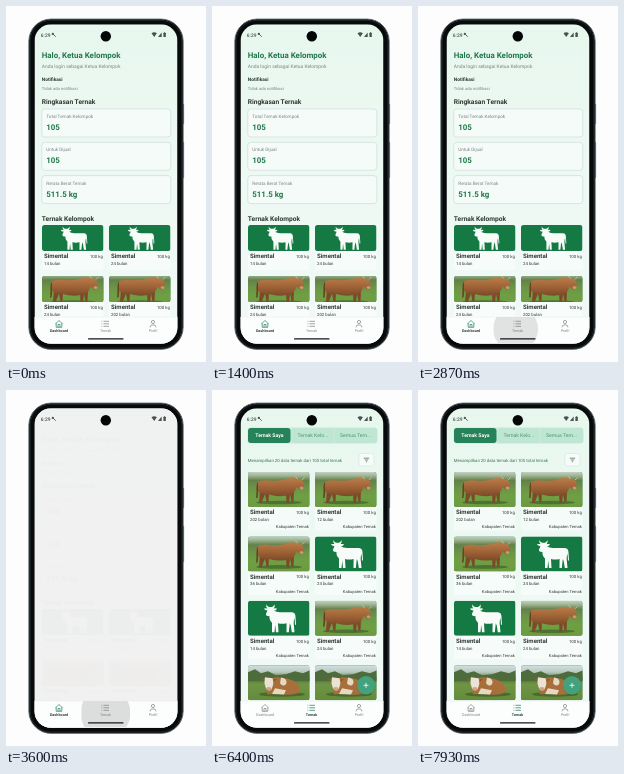
Write an HTML page with a canvas that moves like this. It is 200 by 356 pixels and loops after 8 s.

```html
<!DOCTYPE html>
<html lang="id">
<head>
<meta charset="utf-8">
<title>Ternak</title>
<style>
html, body { margin: 0; width: 100%; height: 100%; overflow: hidden; background: #fdfdfd; }
canvas { display: block; width: 100vw; height: 100vh; }
</style>
</head>
<body>
<canvas id="stage"></canvas>
<script>
const W = 200, H = 356, LOOP = 8000;
const canvas = document.getElementById('stage');
const c = canvas.getContext('2d');
const GREEN = '#21784a', INK = '#303a36', GREY = '#7a8582';
const SCREEN = [28.5, 18.3, 143, 319.5, 16.5];

const clamp = v => Math.max(0, Math.min(1, v));
const ramp = (t, a, b) => clamp((t - a) / (b - a));

function box(x, y, w, h, r, fill, stroke, lw = 0.6) {
  c.beginPath();
  c.roundRect(x, y, w, h, r);
  if (fill) { c.fillStyle = fill; c.fill(); }
  if (stroke) { c.strokeStyle = stroke; c.lineWidth = lw; c.stroke(); }
}

function disc(x, y, rx, ry, fill) {
  c.beginPath();
  c.ellipse(x, y, rx, ry, 0, 0, Math.PI * 2);
  c.fillStyle = fill;
  c.fill();
}

function shape(d, fill) {
  c.fillStyle = fill;
  c.fill(new Path2D(d));
}

function line(d, color, lw) {
  c.strokeStyle = color;
  c.lineWidth = lw;
  c.stroke(new Path2D(d));
}

function text(s, x, y, size, color, weight = 400, align = 'left') {
  c.font = `${weight} ${size}px Roboto, sans-serif`;
  c.textAlign = align;
  c.fillStyle = color;
  c.fillText(s, x, y);
}

function clipped(x, y, w, h, r, paint) {
  c.save();
  c.beginPath();
  c.roundRect(x, y, w, h, r);
  c.clip();
  paint();
  c.restore();
}

function vertical(y0, y1, ...stops) {
  const g = c.createLinearGradient(0, y0, 0, y1);
  stops.forEach(([p, col]) => g.addColorStop(p, col));
  return g;
}

// Pictures are painted in a 62 x 35 space.
const pictures = {
  icon() {
    shape('M19.500 7.500 Q17.500 6 18.500 3.500 Q19 5.800 21 6.300 L24 6.300 Q26 5.800 26.300 3.500 ' +
      'Q27.500 6 25.600 7.500 L29 7.600 Q28.500 9.800 26 9.800 Q28 11.500 32 11.500 L44 11.500 ' +
      'Q47.500 11.800 47.500 16 L48 24 L47 24 L46.500 17 Q45.500 20 45.700 23 L46.500 31.500 ' +
      'L43.800 31.500 L42.800 25 L41.800 22.500 L40.800 31.500 L38.500 31.500 L38.600 22.500 ' +
      'Q34 23.500 30 22.500 L30.500 31.500 L28 31.500 L27.200 24 L26.500 31.500 L24 31.500 L24 22 ' +
      'Q21 19 21.500 15.500 Q17.500 15.500 18 13 L19.500 9.800 Q16.500 9.500 16 7.600 Z', '#f8fcf9');
  },
  brown() {
    c.fillStyle = vertical(0, 35, [0, '#c3cfc4'], [0.1, '#a3b596'], [0.24, '#62814a'],
      [0.45, '#6b9446'], [0.7, '#6f9f43'], [1, '#6c9a42']);
    c.fillRect(0, 0, 62, 35);
    disc(31, 30.5, 23, 1.800, '#4c7330');
    shape('M10 10 Q8 12 8.500 20 L8 26 L9.500 26 L10.500 18 Z', '#6b4023');
    shape('M12 18 L11 31 L13.500 31 L17 22 L18.500 30 L20.500 30 L21 20 Z ' +
      'M38 20 L38.500 31 L41 31 L42 22 L43.500 30 L45.500 30 L46 19 Z', '#7a4a29');
    shape('M10 10 Q13 7.500 22 8.500 Q32 9.500 39 7 Q44 5 48 6.500 L54 8 Q56 10 55.500 15 ' +
      'Q54 19 51.500 17.500 L48.500 15 Q47 21 42 23 Q31 25.500 21 22.500 Q12 23 10 18 Z',
      vertical(6, 25, [0, '#b97d49'], [0.5, '#9f6236'], [1, '#774826']));
    disc(53.500, 16, 1.900, 1.500, '#c79a73');
    line('M49.500 7 L47.500 4.500 M54 8 L56.500 5.500', '#d8c8a6', 0.8);
  },
  resting() {
    c.fillStyle = vertical(0, 35, [0, '#d3dfe2'], [0.2, '#b9c9be'], [0.36, '#55743f'],
      [0.55, '#6f9444'], [1, '#648a3c']);
    c.fillRect(0, 0, 62, 35);
    shape('M0 7 L7 4 L13 8 L20 6 L28 10 L38 9 L47 6 L55 8 L62 5 L62 16 L0 16 Z', '#4d6b3b');
    disc(34, 29, 23, 2.500, '#4a6b2e');
    shape('M20 15 Q25 11 34 12.500 Q44 13.500 49 18 Q53 23 51 27.500 Q42 31 30 28.500 L19 29 Q17 22 20 15 Z', '#a96f3b');
    shape('M17 12 L24.500 13 Q26.500 18 23.500 24 Q21 27 18 23 Q15.500 17 17 12 Z', '#ece2d3');
    shape('M33 12.300 Q40 13 38 19 Q35 22 32 18 Z M27 23 L38 25 L36 29.200 L24 28.800 Z', '#e6d9c3');
    shape('M16.500 14 L12.500 13 L16 17 Z M25.500 14 L29.500 13.500 L25.500 17 Z', '#8f5a2d');
    disc(20.800, 23.500, 2.600, 1.800, '#c7a68d');
  }
};

function picture(kind, x, y, h) {
  clipped(x, y, 61.5, h, 2.5, () => {
    c.fillStyle = '#147943';
    c.fillRect(x, y, 61.5, h);
    c.translate(x, y + (h - 35) / 2);
    if (kind === 'icon' && h < 35) {
      c.translate(5.5, 3.1);
      c.scale(0.83, 0.83);
    }
    pictures[kind]();
  });
}

function animal(kind, age, x, y, h, place) {
  const cardH = h + (place ? 23.5 : 19);
  box(x, y, 61.5, cardH, 2.5, 'rgba(255,255,255,.5)');
  picture(kind, x, y, h);
  const base = y + h;
  text('Simental', x + 2, base + 7.2, 6.1, INK, 700);
  text('100 kg', x + 60.8, base + 6.8, 4.3, INK, 400, 'right');
  text(age + ' bulan', x + 2, base + 13.7, 4.3, INK);
  if (place) text('Kabupaten Ternak', x + 60.8, base + 21.2, 4.1, INK, 400, 'right');
}

function backdrop() {
  c.fillStyle = vertical(19, 311, [0, '#e7f7ee'], [0.5, '#edf9f3'], [1, '#f1f9f7']);
  c.fillRect(...SCREEN.slice(0, 4));
}

function summary(y, label, value) {
  box(35.8, y, 129, 28, 3, '#f5fbf9', '#cfdbda', 0.7);
  text(label, 40.3, y + 9, 4.6, GREY);
  text(value, 40.3, y + 21, 7.9, GREEN, 700);
}

function dashboard() {
  backdrop();
  text('Halo, Ketua Kelompok', 35.7, 52.2, 7.95, GREEN, 700);
  text('Anda login sebagai Ketua Kelompok', 35.8, 62.2, 4.93, GREY);
  text('Notifikasi', 35.8, 75, 4.8, INK, 700);
  text('Tidak ada notifikasi', 35.8, 84.2, 4.15, GREY);
  text('Ringkasan Ternak', 35.8, 98, 6.65, INK, 700);
  summary(103, 'Total Ternak Kelompok', '105');
  summary(136.3, 'Untuk Dijual', '105');
  summary(169.6, 'Rerata Berat Ternak', '511.5 kg');
  text('Ternak Kelompok', 35.8, 214.7, 6.65, INK, 700);
  animal('icon', 14, 36, 219, 26);
  animal('icon', 24, 103, 219, 26);
  animal('brown', 24, 36, 270, 26);
  animal('brown', 202, 103, 270, 26);
}

const HERD = [
  ['brown', 202], ['brown', 12],
  ['brown', 36], ['icon', 24],
  ['icon', 14], ['brown', 24],
  ['resting', 24], ['resting', 24]
];

function herd() {
  backdrop();
  box(35.5, 37.5, 130, 16, 3, '#c9eada');
  box(36, 38, 42.5, 15, 3, '#258259');
  box(79.5, 38, 42, 15, 3, '#bfe6d2');
  box(122.5, 38, 42.5, 15, 3, '#bfe6d2');
  text('Ternak Saya', 57.3, 47.2, 5.1, '#fff', 700, 'center');
  text('Ternak Kelo...', 100.8, 47.2, 5.1, '#4b9774', 400, 'center');
  text('Semua Tern...', 143.5, 47.2, 5.1, '#4b9774', 400, 'center');
  text('Menampilkan 20 data ternak dari 105 total ternak', 35.8, 71.8, 4.32, '#3b7458');
  box(147, 63.5, 15, 12.5, 2.5, '#f6fcf9', '#d5e5de');
  line('M151.800 68.200 H157.200 M152.800 70 H156.200 M153.900 71.800 H155.100', '#46544f', 0.7);
  HERD.forEach(([kind, age], i) =>
    animal(kind, age, i % 2 ? 103 : 36, 82 + 64.4 * (i >> 1), 35, true));
  disc(154, 296, 9.5, 9.5, 'rgba(20,60,40,.16)');
  disc(154, 295.3, 9.2, 9.2, '#43a17b');
  line('M151.500 295.300 H156.500 M154 292.800 V297.800', '#fff', 0.8);
}

function nav(t) {
  c.fillStyle = '#fcfdfd';
  c.fillRect(28, 311, 144, 27);
  c.fillStyle = '#e6ebe9';
  c.fillRect(28, 310.8, 144, 0.5);

  const grow = ramp(t, 2500, 3500);
  const gone = ramp(t, 5600, 5850);
  if (t > 2500 && gone < 1) {
    clipped(75.5, 311, 48.5, 26, 0, () => {
      c.globalAlpha = (0.7 + grow * 0.3) * (1 - gone);
      const r = 21 + 4 * grow;
      disc(96.5 + 3 * grow, 323, r, r, '#dcdddd');
    });
  }

  const first = t < 3730;
  const on = '#258259', off = '#7c8582';
  line('M49.300 318 L53 314.500 L56.700 318 M50.200 317.300 V321.300 H55.800 V317.300 M52 321.200 V318.500 H54 V321.200', first ? on : off, 0.7);
  line('M97.500 315.300 H103 M97.500 317.800 H103 M97.500 320.300 H103 M95.500 315.300 H96.300 M95.500 317.800 H96.300 M95.500 320.300 H96.300', first ? off : on, 0.75);
  c.beginPath();
  c.arc(147, 316, 1.6, 0, Math.PI * 2);
  c.strokeStyle = off;
  c.lineWidth = 0.7;
  c.stroke();
  line('M144 321.300 Q144 318.800 147 318.800 Q150 318.800 150 321.300', off, 0.7);
  text('Dashboard', 53, 326.2, 3.75, first ? INK : off, first ? 700 : 400, 'center');
  text('Ternak', 99.5, 326.2, 3.7, first ? off : INK, first ? 400 : 700, 'center');
  text('Profil', 147, 326.2, 3.75, off, 400, 'center');
  box(82, 332.3, 35.5, 1.1, 0.5, '#161918');
}

function status() {
  const ink = '#4a514f';
  text('6:29', 34.8, 30.5, 4.9, ink, 500);
  line('M47 28 L49.700 30.700', ink, 0.9);
  disc(46.8, 27.9, 1.1, 1.1, ink);
  shape('M145.500 27.300 Q148.200 25.200 150.900 27.300 L148.200 31 Z', ink);
  shape('M152 31 L155.700 31 L155.700 26.600 Z', ink);
  box(157.4, 26.8, 2.4, 4.3, 0.5, ink);
  box(158.1, 26.2, 1, 0.8, 0.2, ink);
  disc(99.8, 30.2, 5.2, 5.2, '#050606');
}

function veil(alpha) {
  c.globalAlpha = alpha;
  c.fillStyle = '#f1f1f1';
  c.fillRect(...SCREEN.slice(0, 4));
  c.globalAlpha = 1;
}

function content(t) {
  if (t < 3730) {
    dashboard();
    if (t >= 3530) veil(t < 3600 ? 0.7 : 0.975);
  } else {
    herd();
    veil(1 - ramp(t, 3800, 4130));
  }
}

function phone(t) {
  box(176.3, 98, 1.8, 20, 0.7, '#5d6a6d');
  box(176.3, 136, 1.8, 36, 0.7, '#5d6a6d');
  box(22.9, 13.1, 154.2, 330.2, 22, '#07090a', '#5a686b', 1);
  box(24.2, 14.4, 151.6, 327.6, 20.7, null, '#22292b', 0.8);
  clipped(...SCREEN, () => {
    content(t);
    nav(t);
    status();
  });
}

function frame(now) {
  const d = devicePixelRatio || 1;
  const pw = Math.round(innerWidth * d), ph = Math.round(innerHeight * d);
  if (canvas.width !== pw || canvas.height !== ph) {
    canvas.width = pw;
    canvas.height = ph;
  }
  c.setTransform(pw / W, 0, 0, ph / H, 0, 0);
  c.textRendering = 'geometricPrecision';
  c.fillStyle = '#fdfdfd';
  c.fillRect(0, 0, W, H);
  phone(now % LOOP);
  requestAnimationFrame(frame);
}
requestAnimationFrame(frame);
</script>
</body>
</html>
```
